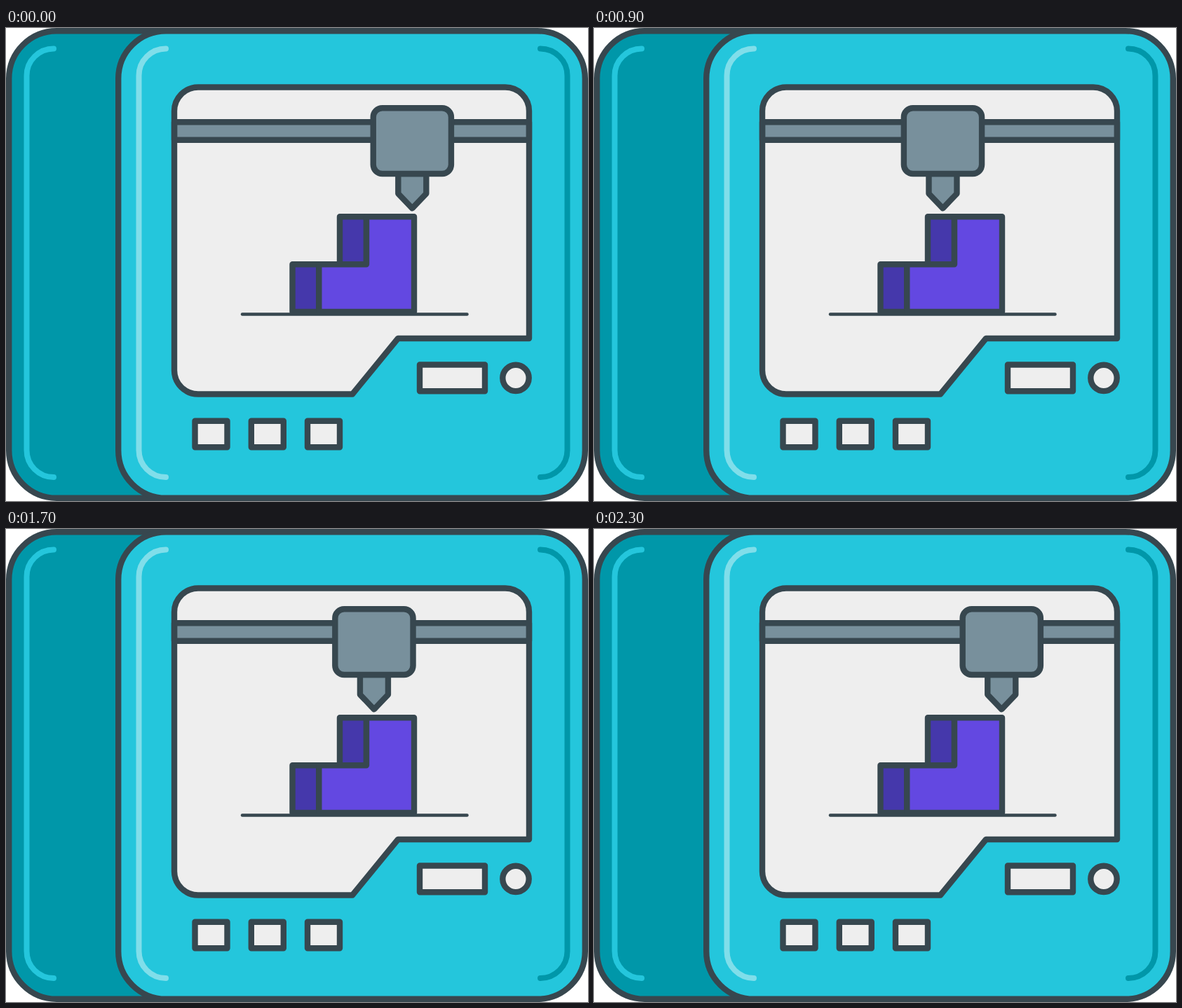
These frames come from a looping animation (830 px wide and 675 px high, 2.5 s). An HTML page:

```html
<!DOCTYPE html>
<html lang="en">
<head>
<meta charset="utf-8">
<title>3D printer</title>
<style>
  html, body { margin: 0; width: 100%; height: 100%; overflow: hidden; background: #fff; }
  svg { display: block; width: 830px; height: 675px; }
  .line { stroke: #37474f; stroke-width: 8.4; stroke-linejoin: round; stroke-linecap: round; }
  .shine { fill: none; stroke-width: 8; stroke-linecap: round; }
  .cyan { fill: #24c6dc; }
  .teal { fill: #0097a9; }
  .pale { fill: #eee; }
  .steel { fill: #78909c; }
  .violet { fill: #6348e1; }
  .indigo { fill: #4538ab; }
  .none { fill: none; }
</style>
</head>
<body>
<svg viewBox="0 0 830 675">
  <defs>
    <path id="window" d="M274 84.5H712A34 34 0 0 1 746 118.5V443H559L494 522.5H274A34 34 0 0 1 240 488.5V118.5A34 34 0 0 1 274 84.5Z"/>
    <path id="shine" d="M38.5 0A38.5 38.5 0 0 0 0 38.5V573A38.5 38.5 0 0 0 38.5 611.5"/>
  </defs>

  <!-- case -->
  <rect class="line teal" x="4.2" y="4.2" width="400" height="666.6" rx="68"/>
  <rect class="line cyan" x="160.2" y="4.2" width="665.6" height="666.6" rx="68"/>
  <use href="#shine" class="shine" stroke="#24c6dc" x="29.5" y="29.5"/>
  <use href="#shine" class="shine" stroke="#80deea" x="189.5" y="29.5"/>
  <use href="#shine" class="shine" stroke="#0097a9" transform="translate(800.5 29.5) scale(-1 1)"/>

  <!-- window and rail -->
  <use href="#window" class="pale"/>
  <path class="line steel" d="M240 134.3H746V159.8H240Z"/>
  <use href="#window" class="line none"/>

  <!-- printed part -->
  <path class="line none" style="stroke-width:4.5" d="M337 408.5H657.5"/>
  <path class="line indigo" d="M476 269.3H514V337.3H476ZM408.5 337.3H446.3V405H408.5Z"/>
  <path class="line violet" d="M446.3 337.3H514V269.3H582V405H446.3Z"/>

  <!-- print head, centred on x = 0 -->
  <g id="head" class="line steel">
    <path d="M-20 208V236.3L0 257.3L20 236.3V208Z"/>
    <rect x="-55.6" y="114.2" width="111.2" height="93.8" rx="13"/>
  </g>

  <!-- controls -->
  <g class="line pale">
    <path d="M269.5 560.7h46v37.6h-46ZM349.8 560.7h46v37.6h-46ZM430 560.7h46v37.6h-46Z"/>
    <path d="M590 480.5H683V518.3H590Z"/>
    <circle cx="727" cy="499.4" r="18.7"/>
  </g>
</svg>
<script>
  const LOOP = 2500, STEP = 100, LAST = 23;
  const LEFT = 472, SPAN = 110.5, SPEED = 9.8, TURN = 11.6;
  const head = document.getElementById('head');
  const start = performance.now();

  // Constant speed back and forth, reversing at both ends.
  function headX(step) {
    const d = SPEED * Math.abs(step - TURN);
    return LEFT + (d > SPAN ? 2 * SPAN - d : d);
  }

  function draw(now) {
    const t = Math.max(0, now - start) % LOOP;
    const step = Math.min(Math.floor(t / STEP), LAST);
    head.setAttribute('transform', `translate(${headX(step).toFixed(2)} 0)`);
    requestAnimationFrame(draw);
  }
  draw(start);
</script>
</body>
</html>
```
